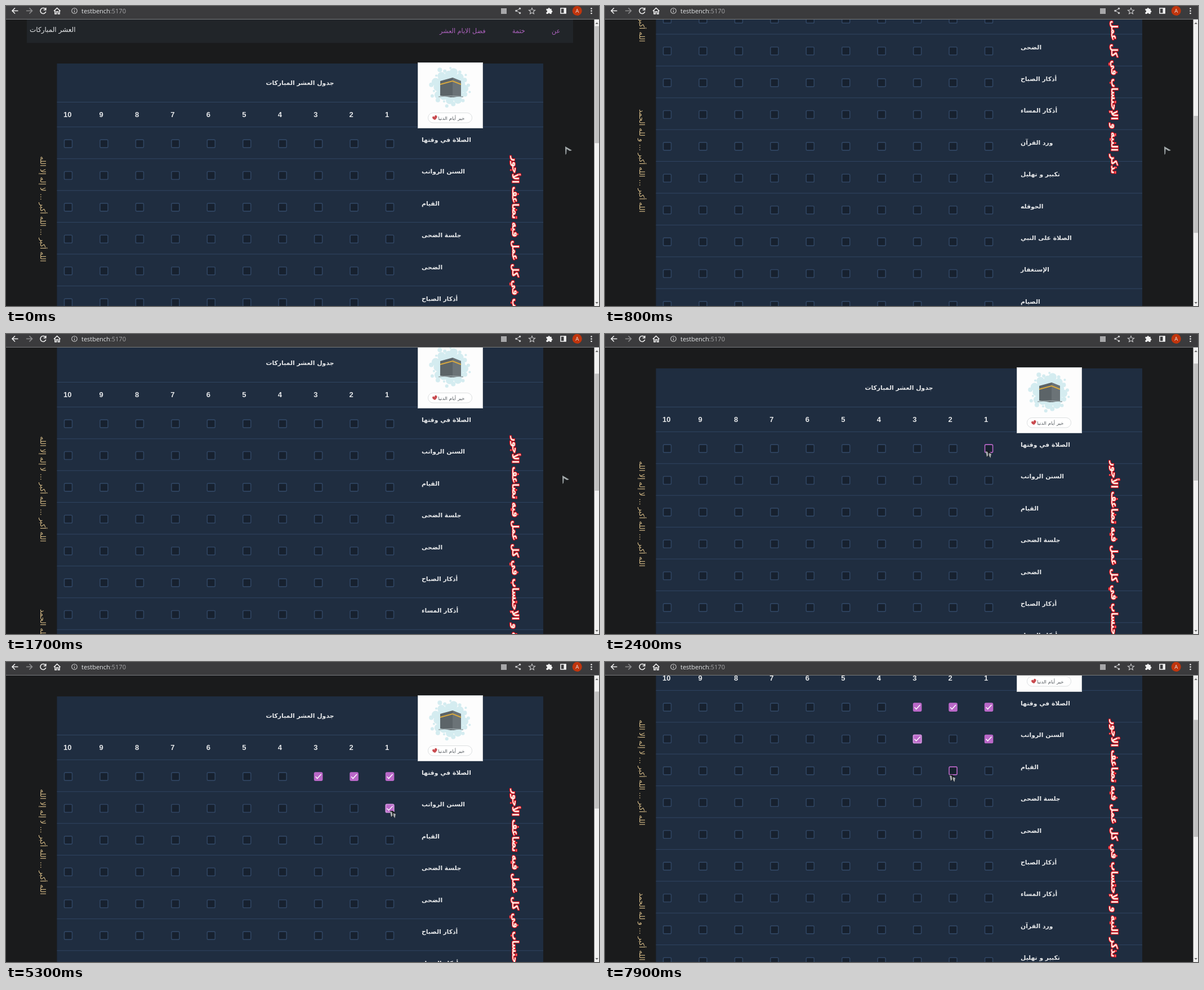
An HTML page that plays this animation: 1053x532 px, repeating every 8 s.

```html
<!DOCTYPE html>
<html lang="ar">
<head>
<meta charset="utf-8">
<style>
html, body { margin: 0; width: 100%; height: 100%; overflow: hidden; background: #1a1b1c; }
svg { display: block; width: 1053px; height: 532px; }
text { font-family: "DejaVu Sans", sans-serif; fill: #e4e6e8; }
.bold { font-weight: bold; }
.number { font: bold 13px "Liberation Sans", Arial, sans-serif; }
.link { fill: #b063c0; }
.url { font: 11px "Open Sans", sans-serif; }
.line { stroke: #304562; }
.side { font-size: 12.6px; fill: #d8bd88; }
.banner { font-size: 16px; fill: #f7eee4; stroke: #e8101c; stroke-width: 2.4px; paint-order: stroke; stroke-linejoin: round; }
.icon { fill: none; stroke: #f1f1f1; stroke-width: 1.6; }
.box rect { fill: #17212f; stroke: #304562; stroke-width: 1.6; }
.box path { fill: none; stroke: #fff; stroke-width: 1.4; visibility: hidden; }
.hover rect, .fresh rect { stroke: #ba68c8; }
.checked rect { fill: #ba68c8; stroke: #ba68c8; }
.checked path, .fresh path { visibility: visible; }
.focus rect { stroke: #cf90db; stroke-width: 2.2; }
</style>
</head>
<body>
<svg viewBox="0 0 1053 532">
  <rect width="1053" height="532" fill="#1a1b1c"/>
  <g id="page">
    <rect x="37" y="20" width="970" height="45.5" fill="#212529"/>
    <text x="42" y="46" font-size="12">العشر المباركات</text>
    <g font-size="11.2">
      <text class="link" x="770" y="48">فضل الايام العشر</text>
      <text class="link" x="899" y="48">ختمة</text>
      <text class="link" x="969" y="48">عن</text>
    </g>
    <rect x="90.5" y="102" width="863.5" height="1000" fill="#1f2d40"/>
    <path class="line" d="M90.5 170.5H954"/>
    <text class="bold" x="522" y="140" font-size="10.9" text-anchor="middle">جدول العشر المباركات</text>
    <g id="table"></g>
    <g id="picture">
      <rect x="731.5" y="100.5" width="115" height="116" fill="#fdfdfd" stroke="#c9cdd0"/>
      <g id="wash" fill="#bfe3ea" opacity=".65"></g>
      <path d="M771 133L793 127L808 133V160L790 162L771 159Z" fill="#5c6468"/>
      <path d="M793 127L808 133V160L793 162Z" fill="#6b7377"/>
      <path d="M771 139L793 133L808 139" fill="none" stroke="#d9a93f" stroke-width="2"/>
      <path d="M768 161Q790 158 812 161" fill="none" stroke="#9aa5a8" stroke-width="1.5"/>
      <rect x="749.5" y="189.5" width="78" height="17.5" rx="8.7" fill="#fff" stroke="#dcdfe0"/>
      <text x="767" y="201.5" font-size="8.5" style="fill:#555b60">خير أيام الدنيا</text>
      <path d="M757 197q2-3 4 0q0-4 3-3q4 2-2 8q-5-1-5-5Z" fill="#c94b50"/>
    </g>
    <g text-anchor="middle">
      <text class="side" transform="translate(60.5 360) rotate(90)">الله أكبر ... الله أكبر ... لا إله إلا الله</text>
      <text class="side" transform="translate(60.5 664.5) rotate(90)">الله أكبر ... الله أكبر ... و لله الحمد</text>
      <text class="banner bold" transform="translate(898.5 477) rotate(90)">تذكر النية و الإحتساب في كل عمل فيه تضاعف الأجور</text>
    </g>
  </g>

  <g id="scrollbar">
    <rect x="1044.5" y="24" width="8.5" height="508" fill="#f1f1f1"/>
    <rect id="thumb" x="1045.5" width="7.5" height="207.5" fill="#c1c1c1"/>
    <path d="M1046.5 32l2.7-3 2.7 3ZM1046.5 525l2.7 3 2.7-3Z" fill="#666"/>
  </g>

  <g id="toolbar">
    <rect width="1053" height="23" fill="#3b3b3d"/>
    <rect y="23" width="1053" height="1" fill="#77797b"/>
    <path class="icon" d="M21.5 8.5H11.5M16 3.5l-5 5 5 5"/>
    <path class="icon" d="M36 8.5H46M41.5 3.5l5 5-5 5" style="stroke:#8b8b8d"/>
    <path class="icon" d="M70 5.5A5 5 0 1 0 70.8 10M70.8 3v4h-4"/>
    <path class="icon" d="M85 9l5.7-5.5L96.5 9M87 8v6h2.5v-4h3v4H95V8"/>
    <circle class="icon" cx="121.5" cy="8.5" r="4.8" style="stroke-width:1.1;stroke:#c8c8ca"/>
    <path d="M121.5 8v3.3M121.5 5.6v1.2" stroke="#c8c8ca" stroke-width="1.2"/>
    <text class="url" x="134" y="12.5">testbench<tspan fill="#a8a8aa">:5170</tspan></text>
    <rect x="879" y="4" width="10" height="10" fill="#a7a7a9"/>
    <g fill="#c8c8ca">
      <path d="M913 4.5l-7 4 7 4" fill="none" stroke="#c8c8ca"/>
      <circle cx="912.5" cy="4.5" r="1.8"/><circle cx="906" cy="8.5" r="1.8"/><circle cx="912.5" cy="12.5" r="1.8"/>
    </g>
    <path class="icon" style="stroke-width:1.1;stroke:#c8c8ca" d="M934 3.5l1.5 3.6 4 .3-3 2.6.9 3.8-3.4-2-3.4 2 .9-3.8-3-2.6 4-.3Z"/>
    <path fill="#f1f1f1" d="M959.5 5h3a1.7 1.7 0 0 1 3.4 0h2.8v3a1.7 1.7 0 0 1 0 3.4v2.6h-3a1.6 1.6 0 0 0-3.2 0h-3v-3a1.6 1.6 0 0 0 0-3.2Z"/>
    <path class="icon" d="M985 4h9v9h-9Z"/>
    <rect x="990.5" y="4" width="4" height="9" fill="#f1f1f1"/>
    <circle cx="1014.2" cy="8.5" r="8.5" fill="#c1350d"/>
    <text class="url" x="1014.2" y="12" text-anchor="middle" style="font-size:9.5px">A</text>
    <g fill="#f1f1f1"><circle cx="1039.5" cy="4.5" r="1.3"/><circle cx="1039.5" cy="8.7" r="1.3"/><circle cx="1039.5" cy="13" r="1.3"/></g>
  </g>

  <g id="cursor">
    <g id="arrow">
      <path d="M0 0L12 7L5 9L1 15Z" fill="#1d2022"/>
      <path d="M0 0L12 7L8 8L2.5 4.5L2 13L.5 15Z" fill="#a3a9aa"/>
    </g>
    <g id="hand">
      <path d="M0 0H5L10 5L9 13L5 9L2 12Z" fill="#17191c"/>
      <path d="M0 1L3.5 2L4.5 8L2 11ZM5.5 4L10 5.5L8.5 13L6 9Z" fill="#a8adb0"/>
    </g>
  </g>
</svg>
<script>
const LOOP = 8000, STEP = 100;
const ROW_TOP = 214.4, ROW_PITCH = 56.4, COL_PITCH = 63.45;
const labels = ['الصلاة في وقتها', 'السنن الرواتب', 'القيام', 'جلسة الضحى', 'الضحى',
  'أذكار الصباح', 'أذكار المساء', 'ورد القرآن', 'تكبير و تهليل', 'الحوقله',
  'الصلاة على النبي', 'الإستغفار', 'الصيام', 'الصدقة', 'الدعاء'];

// [time, scroll offset]
const scrollKeys = [[0, 0], [100, 20], [400, 220], [500, 250], [600, 250], [800, 390], [1000, 480],
  [1100, 450], [1200, 373], [1500, 170], [1700, 85], [1800, 60], [2000, 41],
  [6900, 41], [7000, 51], [7200, 130], [7500, 164]];
// [time, x, y]
const cursorKeys = [[0, 993, 249], [1400, 993, 249], [1700, 988, 251], [2000, 716, 247], [2100, 716, 247],
  [2400, 676, 207], [3100, 676, 207], [3400, 616, 208], [3700, 616, 208], [3900, 558, 207],
  [4500, 558, 207], [4600, 689, 284], [4700, 689, 284], [4900, 700, 280], [5100, 682, 264],
  [5300, 682, 264], [5600, 614, 262], [6000, 582, 262], [6100, 582, 262], [6300, 556, 264],
  [6600, 556, 264], [6700, 593, 267], [6900, 593, 267], [7900, 612, 200]];
const clicks = [
  { time: 3050, row: 0, day: 1 }, { time: 3650, row: 0, day: 2 }, { time: 4450, row: 0, day: 3 },
  { time: 5150, row: 1, day: 1 }, { time: 6600, row: 1, day: 3 }];

const byId = id => document.getElementById(id);
function add(parent, tag, attrs, content = '') {
  const node = document.createElementNS('http://www.w3.org/2000/svg', tag);
  for (const name in attrs) node.setAttribute(name, attrs[name]);
  node.textContent = content;
  return parent.appendChild(node);
}

const page = byId('page'), table = byId('table'), boxes = [];
const columnX = day => 110.5 + (10 - day) * COL_PITCH;
for (let day = 1; day <= 10; day++)
  add(table, 'text', { class: 'number', x: columnX(day) - 8.5, y: 196.5 }, day);
labels.forEach((label, row) => {
  const top = ROW_TOP + row * ROW_PITCH;
  add(table, 'path', { class: 'line', d: `M90.5 ${top}H954` });
  add(table, 'text', { class: 'bold', x: 738, y: top + 26.5, 'font-size': 10.8 }, label);
  for (let day = 1; day <= 10; day++) {
    const x = columnX(day), y = top + 29.7;
    const node = add(table, 'g', { transform: `translate(${x} ${y})` });
    add(node, 'rect', { x: -7, y: -7, width: 14, height: 14, rx: 1.8 });
    add(node, 'path', { d: 'M-5 0L-2 3.5L5 -4' });
    boxes.push({ node, x, y, click: clicks.find(c => c.row === row && c.day === day) });
  }
});
for (let i = 0; i < 44; i++) {
  const angle = i * 2.4, radius = 5.5 * Math.sqrt(i);
  add(byId('wash'), 'circle', {
    cx: 789 + radius * Math.cos(angle), cy: 143 + radius * Math.sin(angle), r: i < 26 ? 7 : 2 + i % 3
  });
}

function sample(keys, t) {
  const next = keys.findIndex(key => key[0] > t);
  if (next < 0) return keys[keys.length - 1].slice(1);
  const a = keys[next - 1], b = keys[next], part = (t - a[0]) / (b[0] - a[0]);
  return a.slice(1).map((value, i) => value + (b[i + 1] - value) * part);
}

function render(now) {
  const t = Math.floor(now % LOOP / STEP) * STEP;
  const [scroll] = sample(scrollKeys, t), [x, y] = sample(cursorKeys, t);
  const latest = clicks.filter(c => c.time <= t).pop();
  let pointing = false;
  for (const box of boxes) {
    const hover = Math.abs(x - box.x) < 8 && Math.abs(y + scroll - box.y) < 8;
    const age = box.click ? t - box.click.time : -1;
    const filled = age >= 150;
    pointing = pointing || hover;
    box.node.setAttribute('class', ['box', hover && 'hover', filled && 'checked',
      age >= 0 && !filled && 'fresh', filled && box.click === latest && 'focus'].filter(Boolean).join(' '));
  }
  page.setAttribute('transform', `translate(0 ${-scroll})`);
  byId('thumb').setAttribute('y', 35.7 + scroll * 0.408);
  byId('cursor').setAttribute('transform', `translate(${x} ${y})`);
  byId('arrow').setAttribute('visibility', pointing ? 'hidden' : 'visible');
  byId('hand').setAttribute('visibility', pointing ? 'visible' : 'hidden');
}

const start = performance.now();
function tick() {
  render(performance.now() - start);
  requestAnimationFrame(tick);
}
tick();
</script>
</body>
</html>
```
